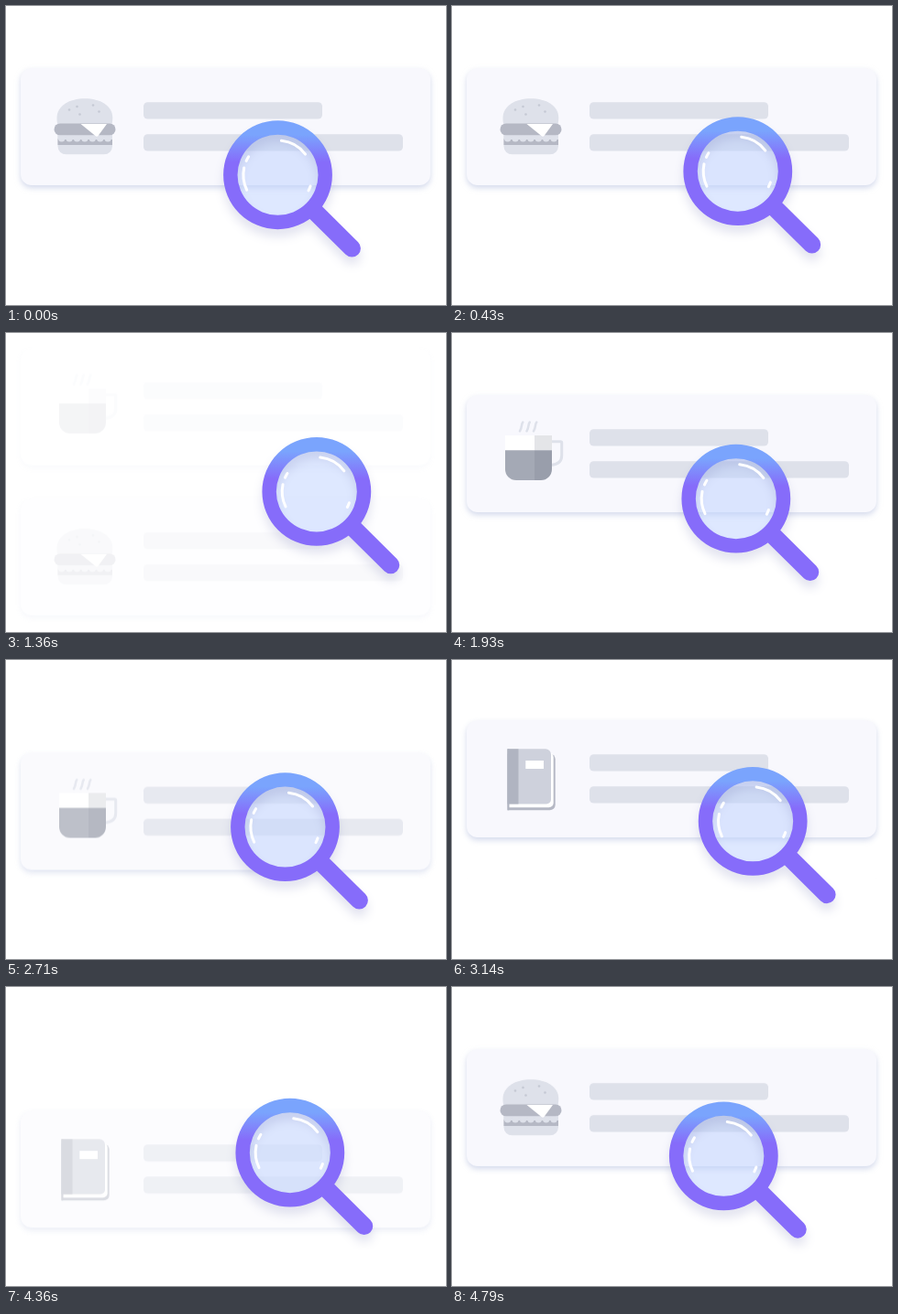
An HTML page with a canvas for the animation above (4870 ms loop, 480 by 327 pixels).

```html
<!DOCTYPE html>
<html lang="en">
<head>
<meta charset="utf-8">
<title>Search cards</title>
<style>
html, body { margin: 0; width: 100%; height: 100%; overflow: hidden; background: #fff; }
canvas { display: block; width: 480px; height: 327px; }
</style>
</head>
<body>
<canvas id="stage"></canvas>
<script>
const W = 480, H = 327, LOOP = 4870, STEPS = 68;
const STEP_MS = LOOP / STEPS;
const LIGHT = '#dee1ea', MID = '#b5b8c4', WHITE = '#fff', PURPLE = '#866cfa';
const SWAP_STARTS = [11.9, 33.4, 55.2], SWAP_LENGTH = 12.4, CARD_TRAVEL = 164;
const ratio = window.devicePixelRatio || 1;

function prepare(canvas) {
  canvas.width = Math.round(W * ratio);
  canvas.height = Math.round(H * ratio);
  const c = canvas.getContext('2d');
  c.scale(ratio, ratio);
  c.lineCap = 'round';
  c.lineJoin = 'round';
  return c;
}

function box(c, color, x, y, w, h, r = 0) {
  c.fillStyle = color;
  c.beginPath();
  c.roundRect(x, y, w, h, r);
  c.fill();
}

function dot(c, color, x, y, r) {
  c.fillStyle = color;
  c.beginPath();
  c.arc(x, y, r, 0, Math.PI * 2);
  c.fill();
}

function shadow(c, color, blur, y) {
  c.shadowColor = color;
  c.shadowBlur = blur * ratio;
  c.shadowOffsetY = y * ratio;
}

function strokePath(c, color, width, d) {
  c.strokeStyle = color;
  c.lineWidth = width;
  c.stroke(new Path2D(d));
}

function fillPath(c, color, d) {
  c.fillStyle = color;
  c.fill(new Path2D(d));
}

function burger(c) {
  fillPath(c, LIGHT, 'M57 131C55.5 128 55.5 125 55.5 122C56 109 69 101.3 86 101.3C103 101.3 116 109 116.3 122C116.3 125 116 128 115 131Z');
  for (const [x, y] of [[69, 113.5], [77.5, 110], [95, 108.5], [101.5, 115.5], [80.5, 118.5]]) {
    dot(c, '#c5c9d4', x, y, 1.3);
  }
  box(c, LIGHT, 56.5, 141, 59.5, 21.3, [0, 0, 9, 9]);
  box(c, MID, 56.5, 145, 59.5, 7);
  box(c, LIGHT, 56.5, 141, 59.5, 5);
  for (let i = 0; i < 7; i++) dot(c, LIGHT, 60.7 + i * 8.4, 145, 3.6);
  box(c, MID, 52.5, 128.5, 67, 12.8, 6.4);
  fillPath(c, WHITE, 'M81.5 129H110L100.5 142Q99.3 143.5 97.5 142Z');
}

function coffee(c) {
  strokePath(c, LIGHT, 3, 'M108 118.8H118.5Q119.7 118.8 119.7 120V134Q119.7 143.5 108 144.5');
  for (let i = 0; i < 3; i++) {
    const x = 74 + i * 7.5;
    strokePath(c, LIGHT, 2.5, `M${x + 3.3} 97.5C${x + 1} 101 ${x + 3} 102 ${x} 107.3`);
  }
  c.save();
  c.beginPath();
  c.roundRect(58, 112, 51, 49, [0, 0, 12, 12]);
  c.clip();
  box(c, WHITE, 58, 112, 32, 16.3);
  box(c, '#e4e5e8', 90, 112, 19, 16.3);
  box(c, '#a4a9b5', 58, 128.3, 32, 33);
  box(c, '#999eab', 90, 128.3, 19, 33);
  c.restore();
}

function book(c) {
  box(c, MID, 60.5, 104.5, 52.2, 61.8, [0, 6, 6, 0]);
  box(c, WHITE, 62.3, 102.5, 48.4, 60.8, [0, 6, 5, 0]);
  box(c, '#ced1dc', 60.5, 99.3, 47.5, 60.2, [0, 6, 5, 0]);
  box(c, '#b0b4c1', 60.5, 99.3, 12, 60.2);
  box(c, '#b0b4c1', 60.5, 99.3, 1.8, 67);
  box(c, WHITE, 80.3, 112, 19.7, 9);
}

function makeCard(icon) {
  const canvas = document.createElement('canvas');
  const c = prepare(canvas);
  shadow(c, 'rgba(176,188,220,.55)', 6, 3);
  box(c, '#f8f8fd', 16, 68, 447, 128, 12);
  shadow(c, 'transparent', 0, 0);
  box(c, LIGHT, 150, 105.3, 195, 18.3, 4.5);
  box(c, LIGHT, 150, 140.2, 283, 18.3, 4.5);
  icon(c);
  return canvas;
}

const ctx = prepare(document.getElementById('stage'));
const cards = [burger, coffee, book].map(makeCard);

const easeInOut = p => p < 0.5 ? 4 * p ** 3 : 1 - 4 * (1 - p) ** 3;

function smooth(from, to, v) {
  const p = Math.min(1, Math.max(0, (v - from) / (to - from)));
  return p * p * (3 - 2 * p);
}

function drawCard(index, y, alpha) {
  ctx.globalAlpha = alpha;
  ctx.drawImage(cards[index % 3], 0, y, W, H);
  ctx.globalAlpha = 1;
}

function drawCards(step) {
  const active = SWAP_STARTS.findIndex(s => step >= s && step < s + SWAP_LENGTH);
  if (active < 0) {
    drawCard(SWAP_STARTS.filter(s => step >= s).length, 0, 1);
    return;
  }
  const e = easeInOut((step - SWAP_STARTS[active]) / SWAP_LENGTH);
  drawCard(active, CARD_TRAVEL * e, (1 - e) ** 1.4);
  drawCard(active + 1, -CARD_TRAVEL * (1 - e), smooth(0.6, 1, e));
}

function glint(from, to) {
  const rad = Math.PI / 180;
  ctx.beginPath();
  ctx.arc(0, 0, 37.6, from * rad, to * rad);
  ctx.stroke();
}

const rim = ctx.createLinearGradient(0, -44, 0, -14);
rim.addColorStop(0, '#7aa4fd');
rim.addColorStop(1, PURPLE);

function drawMagnifier(step) {
  const swing = (1 - Math.cos((step + 0.75) / (STEPS / 2) * Math.PI * 2)) / 2;
  ctx.save();
  ctx.translate(296.3 + 45.4 * swing, 184.8 - 12.1 * swing);
  dot(ctx, 'rgba(190,210,255,.5)', 0, 0, 45);

  // One compound shape, so that rim and handle share a single shadow.
  const body = new Path2D();
  body.arc(0, 0, 59.4, 0, Math.PI * 2);
  body.closePath();
  body.moveTo(44, 0);
  body.arc(0, 0, 44, 0, Math.PI * 2, true);
  body.closePath();
  const handle = new Path2D();
  handle.roundRect(52, -9.6, 71.5, 19.2, [0, 9.6, 9.6, 0]);
  body.addPath(handle, new DOMMatrix().rotate(44.8));
  shadow(ctx, 'rgba(110,115,175,.2)', 11, 8);
  ctx.fillStyle = rim;
  ctx.fill(body);
  shadow(ctx, 'transparent', 0, 0);

  ctx.strokeStyle = WHITE;
  ctx.lineWidth = 3;
  glint(-84, -37);
  glint(154, 192);
  glint(204, 212);
  glint(19, 27);
  ctx.restore();
}

function render(now) {
  const t = now % LOOP;
  const step = Math.floor((t + 12) / STEP_MS) % STEPS;
  ctx.fillStyle = WHITE;
  ctx.fillRect(0, 0, W, H);
  drawCards(step);
  drawMagnifier(step);
}

const start = performance.now();
function tick() {
  render(performance.now() - start);
  requestAnimationFrame(tick);
}
tick();
</script>
</body>
</html>
```
